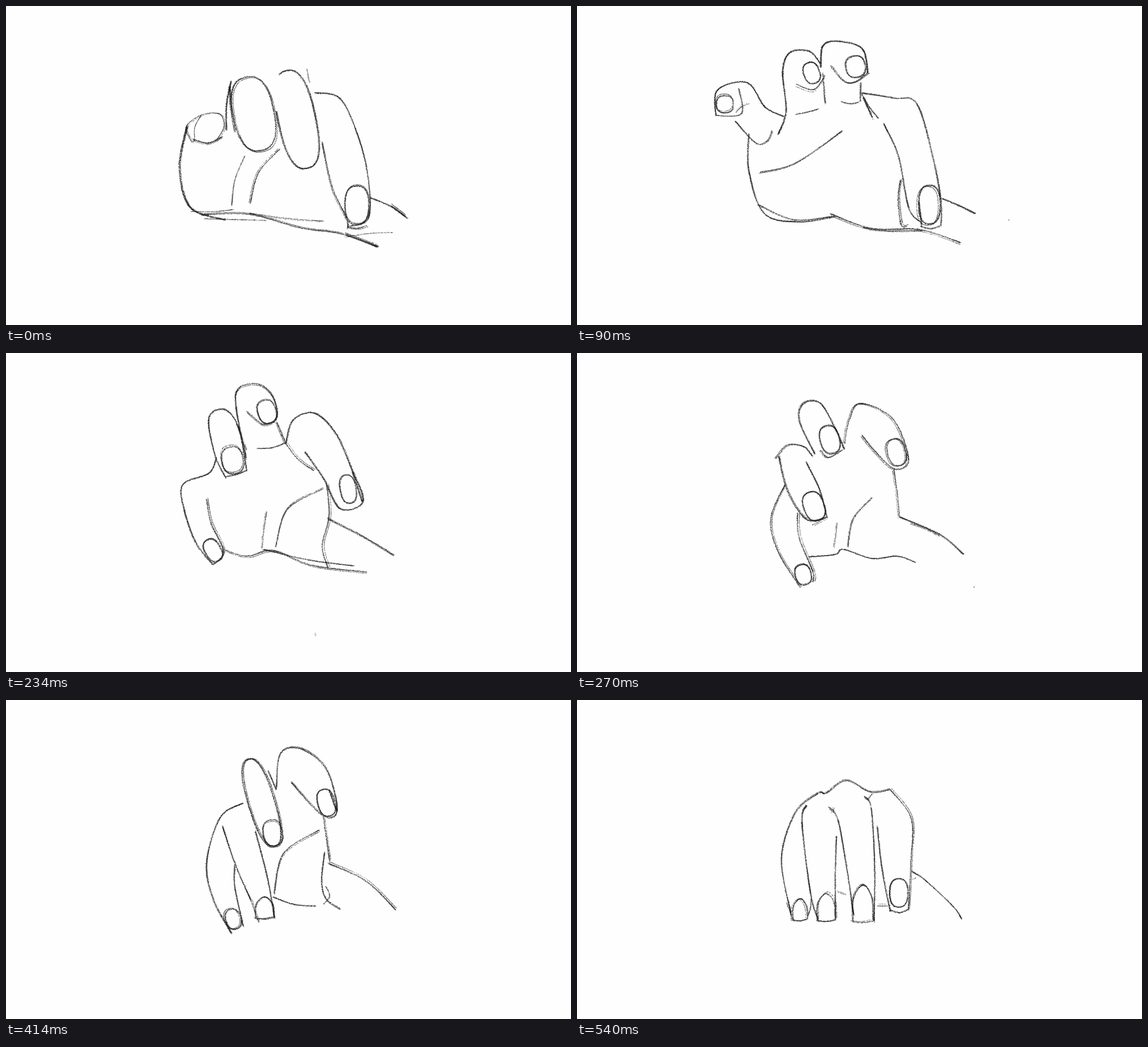
Recreate the animation shown at these times as an HTML page with a canvas. Size 997 by 562 pixels, loop 0.63 s.

```html
<!DOCTYPE html>
<html lang="en">
<head>
<meta charset="utf-8">
<title>Pencil hand</title>
<style>
html, body { margin: 0; width: 100%; height: 100%; overflow: hidden; background: #fefefe; }
canvas { display: block; }
</style>
</head>
<body>
<canvas id="stage" width="997" height="562"></canvas>
<script>
const HOLD = 90;
const ctx = document.getElementById('stage').getContext('2d');
let seed = 1;
const rnd = () => (seed = (seed * 48271) % 2147483647) / 2147483647;
const spread = r => (rnd() + rnd() - 1) * r;

// Catmull-Rom curve through the points, sampled about every half pixel.
function sample(pts) {
  const out = [];
  for (let i = 0; i + 1 < pts.length; i++) {
    const b = pts[i], c = pts[i + 1], a = pts[i - 1] || b, d = pts[i + 2] || c;
    const n = Math.max(2, Math.ceil(Math.hypot(c[0] - b[0], c[1] - b[1]) * 2));
    for (let k = 0; k < n; k++) {
      const t = k / n;
      out.push([0, 1].map(j => b[j] + t / 2 * (c[j] - a[j] +
        t * (2 * a[j] - 5 * b[j] + 4 * c[j] - d[j] + t * (3 * (b[j] - c[j]) + d[j] - a[j])))));
    }
  }
  return out;
}

// Grainy stroke with soft ends and uneven pressure.
function grain(width, line, dx = 0, dy = 0) {
  const phase = rnd() * 6;
  line.forEach(([x, y], i) => {
    const end = Math.min(i, line.length - i) / 40;
    const force = Math.min(1, .5 + end) * (.85 + .25 * Math.sin(i / 37 + phase));
    for (let n = width * 1.5 * force + rnd(); n >= 1; n--) {
      ctx.globalAlpha = .2 + rnd() * .5;
      ctx.fillRect(x + dx + spread(width * .8) - .5, y + dy + spread(width * .8) - .5, 1, 1);
    }
  });
}

// Each firm stroke is shadowed by a faint one that strays a little.
function trace(width, pts) {
  const line = sample(pts);
  grain(width, line);
  grain(width * .35, line, spread(4), spread(4));
}

const pen = (width, text) => trace(width, text.split(' ').map(p => p.split(',').map(Number)));

// Bow from one point to another; a positive bulge lies to the right of the way.
function arc(width, x1, y1, x2, y2, bulge = 0) {
  const dx = x2 - x1, dy = y2 - y1, k = bulge / Math.hypot(dx, dy);
  trace(width, [[x1, y1], [(x1 + x2) / 2 - dy * k, (y1 + y2) / 2 + dx * k], [x2, y2]]);
}

// Tilted, slightly squared ellipse: nails and whole finger pads.
function loop(width, x, y, rx, ry, tilt = 0, from = 0, to = 360) {
  const a = tilt * Math.PI / 180, soft = v => Math.sign(v) * Math.abs(v) ** .8;
  const pts = [];
  for (let i = 0; i <= 24; i++) {
    const t = (from + (to - from) * i / 24) * Math.PI / 180;
    const u = rx * soft(Math.cos(t)), v = ry * soft(Math.sin(t));
    pts.push([x + u * Math.cos(a) - v * Math.sin(a), y + u * Math.sin(a) + v * Math.cos(a)]);
  }
  trace(width, pts);
}

// Nail with a round root and a flat edge.
function cap(x, y, r, h) {
  trace(1.8, [[x - r, y], [x - r + 1, y - h * .65], [x, y - h], [x + r - 2, y - h * .65], [x + r, y - 2]]);
  arc(1.7, x - r, y, x + r, y - 2, 2);
}

function hatch(x, y, w, h) {
  for (let i = -2; i <= 2; i++) {
    arc(.8, x - w / 2 + spread(4), y + i * h / 5 + 3, x + w / 2 + spread(5), y + i * h / 5 - 2, -3);
  }
}

const poses = [
  function curled() {
    pen(2.6, '320,212 307,285 326,355 388,377');
    pen(1.2, '328,240 318,213 345,192 376,190 385,212 370,238');
    arc(1, 333, 238, 345, 192, -6);
    arc(2, 330, 235, 382, 230, 9);
    loop(2, 437, 190, 36, 66, -12);
    arc(2.2, 389, 218, 397, 132, -4);
    arc(2.4, 394, 142, 404, 222, 2);
    loop(2, 513, 200, 33, 88, -12, -110, 190);
    arc(.8, 531, 111, 536, 135);
    pen(1.7, '545,153 588,162 616,215 637,290 640,372 603,389');
    pen(1.7, '558,240 576,320 601,373 603,390');
    loop(1.9, 619, 351, 21, 34);
    arc(1.6, 603, 390, 637, 387, 3);
    arc(1.8, 643, 338, 708, 374, -4);
    arc(2.5, 680, 352, 705, 371);
    arc(1.1, 421, 265, 398, 352, 6);
    arc(1.6, 483, 252, 431, 348, 13);
    pen(1.7, '345,368 430,367 520,391 590,401 656,425');
    arc(2.3, 600, 403, 657, 424);
    arc(.9, 326, 362, 400, 359, 2);
    arc(.8, 350, 375, 460, 378);
    arc(.9, 430, 365, 560, 379, 2);
    arc(.7, 600, 407, 682, 399, -2);
  },
  function opening() {
    pen(2, '245,193 248,148 300,135 332,178 366,195');
    loop(1.9, 261, 173, 15, 15);
    arc(1.3, 245, 193, 285, 145, 32);
    pen(1.7, '279,203 315,241 335,238 344,220');
    arc(.9, 280, 188, 304, 172, -3);
    pen(2.3, '355,226 369,185 363,115 376,82 410,80 430,102');
    loop(2, 414, 118, 14, 19, -20);
    arc(1.4, 387, 138, 438, 122, 18);
    arc(1.8, 434, 118, 438, 172);
    arc(1.2, 386, 191, 425, 182, 1);
    arc(1.2, 467, 169, 498, 170, 3);
    pen(2.4, '430,108 434,70 460,62 503,75 513,118');
    pen(1.7, '513,118 490,134 470,132 447,105');
    loop(1.8, 492, 107, 17, 19, -12);
    arc(1.7, 501, 135, 500, 168);
    pen(1.6, '503,153 560,162 600,172 628,265 642,340 643,385');
    arc(1.5, 503, 155, 532, 198, 2);
    arc(2.3, 505, 161, 521, 196);
    pen(1.6, '541,207 567,265 585,355 605,380');
    pen(2.2, '571,307 567,340 572,385 582,388');
    loop(2.1, 622, 350, 19, 34);
    arc(1.9, 603, 345, 608, 388);
    arc(1.6, 606, 388, 643, 386, 5);
    arc(2.2, 643, 339, 703, 366, -1);
    pen(1.9, '303,225 303,290 330,365 390,380 455,371');
    arc(1.2, 320, 350, 450, 371, 16);
    pen(1.8, '447,366 520,392 605,394 677,417');
    arc(1.2, 505, 391, 610, 396, 4);
    pen(1.5, '322,293 385,277 468,220');
    arc(1, 761, 378, 763, 376);
  },
  function reaching() {
    pen(1.9, '371,185 358,212 312,232 314,275 335,335 365,373');
    pen(2, '354,258 362,300 384,350 365,374');
    loop(1.8, 365, 348, 14, 21, -30);
    pen(1.9, '388,220 369,180 358,115 385,99 410,130 425,208');
    arc(1.5, 407, 125, 424, 172);
    loop(2, 400, 189, 19, 24, -12);
    arc(1.6, 388, 218, 424, 207, 2);
    pen(2, '424,185 406,95 411,62 445,55 470,75 478,112 455,126 425,103');
    loop(1.8, 460, 103, 16, 21, -18);
    arc(1.8, 478, 122, 494, 160);
    arc(1.6, 443, 168, 494, 158, 4);
    pen(2, '494,160 507,118 545,106 583,143 612,208 630,262 590,274 560,220 528,174');
    arc(1.6, 494, 160, 543, 207, 5);
    loop(1.7, 604, 240, 14, 25, -10);
    arc(2.4, 612, 210, 629, 262);
    pen(1.7, '566,232 570,288 558,340 568,378');
    arc(1.9, 568, 291, 685, 356, -2);
    pen(1.7, '386,347 425,358 472,348 540,374 637,386');
    arc(1.3, 455, 346, 615, 375, 4);
    arc(1, 460, 280, 452, 345, 1);
    pen(1.5, '476,342 497,275 560,239');
    arc(.9, 545, 498, 548, 496);
  },
  function clawed() {
    pen(1.7, '367,232 342,292 355,350 394,413');
    pen(1.8, '389,282 392,325 416,385 416,403');
    loop(2, 399, 390, 14, 18, -15);
    pen(1.8, '351,186 372,163 400,165 416,182');
    pen(1.9, '356,182 372,245 405,293 440,290');
    arc(1.8, 404, 192, 441, 290, -5);
    loop(2, 418, 270, 18, 26, -20);
    arc(1.2, 415, 303, 440, 290);
    pen(1.9, '420,178 393,120 400,89 430,89 458,137 472,170');
    loop(1.9, 446, 153, 17, 25, -15);
    pen(1.7, '430,172 444,184 470,170');
    pen(1.8, '472,160 480,120 500,89 558,117 585,188 560,204 525,172 503,145');
    loop(2, 564, 175, 16, 24, -15);
    arc(1.5, 559, 205, 569, 289, -1);
    pen(1.8, '569,289 640,320 682,355');
    arc(1.5, 590, 300, 640, 322, -2);
    pen(1.6, '409,359 455,355 470,346 520,362 565,358 597,369');
    arc(1, 459, 300, 454, 343);
    arc(1.4, 478, 342, 521, 255, -13);
    arc(.9, 700, 413, 702, 411);
  },
  function closing() {
    pen(1.8, '418,182 378,207 354,285 365,350 398,412');
    pen(1.8, '404,293 404,330 419,400');
    loop(2, 401, 386, 13, 18, -18);
    arc(1.8, 382, 222, 432, 352, 3);
    arc(1.5, 432, 352, 446, 392);
    arc(1.8, 440, 232, 474, 385, -3);
    cap(457, 385, 16, 38);
    loop(2.3, 451, 181, 23, 80, -17);
    loop(1.8, 471, 234, 17, 23, -10);
    pen(1.8, '477,156 484,95 520,86 565,122 584,195 558,203 503,145');
    loop(1.8, 565, 181, 15, 24, -15);
    arc(2, 570, 158, 584, 197);
    arc(1.7, 477, 158, 463, 125);
    arc(1.8, 560, 205, 571, 283);
    arc(1.8, 569, 288, 688, 370, -12);
    pen(1.8, '562,268 557,320 565,350 590,368');
    arc(1.5, 564, 328, 560, 360, -9);
    arc(1.5, 471, 347, 547, 363, 5);
    pen(1.6, '473,340 490,270 553,229');
  },
  function pointing() {
    pen(1.8, '388,395 362,295 385,202 430,173 463,153 500,159');
    pen(2.1, '403,196 392,225 406,285 423,375');
    loop(1.9, 402, 383, 14, 20, -12);
    arc(1.5, 390, 403, 419, 400, 2);
    arc(1.7, 437, 210, 497, 388, -7);
    arc(1.9, 452, 250, 467, 388, 1);
    arc(1.5, 424, 360, 437, 398);
    loop(1.9, 450, 371, 16, 22, -8);
    pen(1.9, '501,178 516,205 525,290 534,388');
    arc(2, 519, 225, 528, 320);
    loop(2, 513, 357, 17, 30, -5);
    pen(1.8, '496,370 500,393 533,391');
    pen(1.9, '500,180 498,115 525,92 555,100 577,140 593,228');
    pen(1.8, '515,140 545,195 553,225 568,240 594,230');
    arc(1.8, 524, 155, 545, 198);
    arc(2, 545, 94, 575, 136, -3);
    loop(2, 572, 207, 17, 26, -6);
    arc(1.4, 523, 242, 548, 234, -1);
    pen(1.7, '567,249 558,310 572,358');
    pen(1.7, '569,250 575,285 630,312 690,371');
    arc(1.4, 620, 320, 607, 368, 13);
    arc(1, 466, 345, 486, 349);
    arc(1, 475, 305, 474, 340);
    arc(1.5, 540, 362, 567, 355, 3);
    arc(1.3, 565, 350, 590, 366, 3);
    hatch(377, 274, 22, 13);
    hatch(413, 223, 28, 23);
    hatch(486, 206, 32, 23);
  },
  function resting() {
    pen(1.7, '378,378 361,280 385,200 425,165 440,164 475,142 517,162 553,158');
    pen(1.7, '553,158 590,210 589,290 585,370');
    arc(1.8, 530, 222, 553, 372, 3);
    loop(2.1, 568, 340, 16, 25);
    arc(1.5, 553, 370, 585, 369, 5);
    pen(1.9, '405,185 397,215 412,340 426,388');
    arc(1.3, 413, 352, 407, 382, -2);
    arc(1.3, 370, 357, 381, 388);
    cap(394, 388, 13, 38);
    pen(1.8, '444,188 460,210 475,290 488,378');
    arc(1.5, 458, 240, 456, 385, 1);
    cap(440, 389, 16, 48);
    pen(1.7, '507,170 519,190 525,290 524,390');
    cap(505, 391, 18, 65);
    arc(1.2, 512, 175, 521, 165);
    arc(1.2, 452, 198, 454, 189);
    pen(1.5, '592,303 615,318 665,365 679,386');
    arc(1, 592, 316, 598, 313);
    arc(1.1, 460, 338, 475, 344);
    arc(1.2, 530, 363, 548, 363);
  }
];

let shown = -1;
function draw() {
  const i = Math.floor(performance.now() / HOLD) % poses.length;
  if (i !== shown) {
    shown = i;
    seed = 101 + i * 977;
    ctx.globalAlpha = 1;
    ctx.fillStyle = '#fefefe';
    ctx.fillRect(0, 0, 997, 562);
    ctx.fillStyle = '#1c1c1c';
    poses[i]();
  }
  requestAnimationFrame(draw);
}
draw();
</script>
</body>
</html>
```
